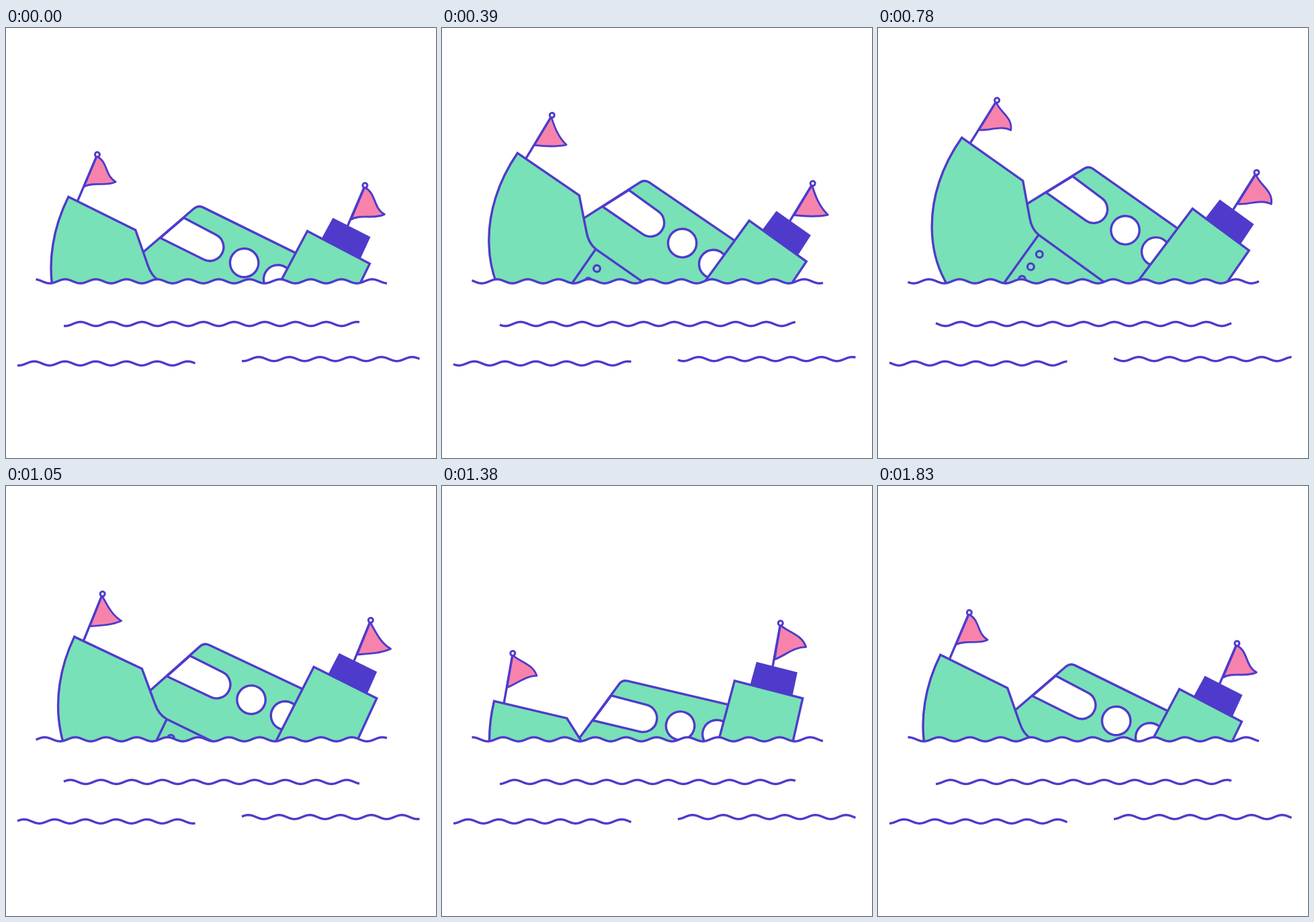
Write an HTML page with a canvas that moves like this. It is 640 by 640 pixels and loops after 1.86 s.

```html
<!DOCTYPE html>
<html lang="en">
<head>
<meta charset="utf-8">
<title>Sinking ship</title>
<style>
  html, body { margin: 0; width: 100%; height: 100%; overflow: hidden; background: #fff; }
  canvas { display: block; width: 100vw; height: 100vh; }
</style>
</head>
<body>
<canvas id="stage" width="640" height="640"></canvas>
<script>
const ctx = document.getElementById('stage').getContext('2d');
const INK = '#4f3bcb', GREEN = '#78e1b7', PINK = '#f783ad', WHITE = '#fff';
const LOOP = 1860, STEP = 30, SWING = 1830, RAD = Math.PI / 180;

// time, then [value, speed per second] for tilt, x, y and flag phase
const KEYS = [
  [0,    [-10.68, 13],  [324.3, 8],   [271.3, -50], [50, 560]],
  [240,  [-6.18, 22],   [329, 42],    [253.8, -88], [175, 660]],
  [540,  [0, 9],        [347.7, 35],  [225.5, -57], [400, 580]],
  [780,  [-1.73, -24],  [350.2, -24], [218.9, 23],  [510, 480]],
  [1050, [-11.65, -46], [333.4, -88], [240.4, 145], [655, 570]],
  [1380, [-23.68, -14], [307.5, -30], [287.5, 60],  [855, 610]],
  [SWING, [-10.68, 13], [324.3, 8],   [271.3, -50], [1130, 560]]
];
const HOME = [347.7, 225.5];

const WAVE = 45.7, WAVE_TIME = 450;
const SEA = [
  { x0: 44.5, x1: 567, y: 377, crest: 88, dir: 1 },
  { x0: 86, x1: 526, y: 440.5, crest: 111, dir: -1 },
  { x0: 17, x1: 281.5, y: 499.2, crest: 42, dir: -1 },
  { x0: 351, x1: 615.5, y: 492.7, crest: 376, dir: -1 }
];

function hermite([a, va], [b, vb], u, dt) {
  const w = 1 - u, s = dt / 1000;
  return a * w * w * (1 + 2 * u) + b * u * u * (3 - 2 * u)
    + va * s * u * w * w - vb * s * u * u * w;
}

function poseAt(t) {
  const time = Math.min(t, SWING);
  let i = 0;
  while (i < KEYS.length - 2 && time >= KEYS[i + 1][0]) i++;
  const from = KEYS[i], to = KEYS[i + 1], dt = to[0] - from[0];
  const u = (time - from[0]) / dt;
  return [1, 2, 3, 4].map(k => hermite(from[k], to[k], u, dt));
}

function paint(fill, width = 3.4) {
  if (fill) { ctx.fillStyle = fill; ctx.fill(); }
  ctx.strokeStyle = INK;
  ctx.lineWidth = width;
  ctx.stroke();
}

function trace(...points) {
  ctx.beginPath();
  points.forEach(p => ctx.lineTo(p[0], p[1]));
}

function ring(x, y, r, fill, width) {
  ctx.beginPath();
  ctx.arc(x, y, r, 0, 2 * Math.PI);
  paint(fill, width);
}

function traceWave({ x0, x1, y, crest, dir }, t) {
  const top = crest + dir * WAVE * t / WAVE_TIME;
  ctx.beginPath();
  for (let x = x0; x <= x1; x += 0.5) {
    ctx.lineTo(x, y - 3 * Math.cos(2 * Math.PI * (x - top) / WAVE));
  }
}

// Edge pushed along (nx, ny) by d1 at one third and d2 at two thirds
function bentEdge(a, b, nx, ny, d1, d2) {
  const p = 3 * d1 - 1.5 * d2, q = 3 * d2 - 1.5 * d1;
  const at = (u, d) => [a[0] + (b[0] - a[0]) * u + nx * d, a[1] + (b[1] - a[1]) * u + ny * d];
  ctx.bezierCurveTo(...at(1 / 3, p), ...at(2 / 3, q), b[0], b[1]);
}

function flag(x, y, foot, size, phase) {
  const inner = 2.7 * Math.sin(phase * RAD);
  const outer = 4.6 * Math.sin((phase - 70) * RAD);
  const head = [-1.2, 2.5], tip = [19.3, 45], heel = [-28.2, 43.3];
  trace(foot, [x - 1.8, y + 2.7]);
  paint(null);
  ctx.save();
  ctx.translate(x, y);
  ctx.scale(size, size);
  ctx.lineJoin = 'round';
  ctx.beginPath();
  ctx.moveTo(...head);
  bentEdge(head, tip, 0.896, -0.444, inner, outer);
  bentEdge(tip, heel, 0, -1, outer * 0.65, inner * 0.65);
  ctx.closePath();
  paint(PINK, 2.8);
  ctx.restore();
  ring(x, y, 3.5, WHITE, 3);
}

function cabin() {
  ctx.beginPath();
  ctx.moveTo(205, 272);
  ctx.arcTo(311.5, 210.6, 440, 307, 12);
  ctx.lineTo(520, 367);
  ctx.lineTo(400, 500);
  ctx.lineTo(205, 400);
  ctx.closePath();
  paint(GREEN);

  ctx.beginPath();
  ctx.moveTo(287, 225.5);
  ctx.arc(317, 275.5, 20.5, -52.6 * RAD, 127.4 * RAD);
  ctx.lineTo(247, 248.4);
  ctx.closePath();
  paint(WHITE);

  ring(363, 308, 21.2, WHITE);
  ring(407.7, 341.3, 21.2, WHITE);
}

function bow() {
  ctx.beginPath();
  ctx.moveTo(124, 163);
  ctx.lineTo(213, 230);
  ctx.lineTo(221.3, 285);
  ctx.bezierCurveTo(223, 298, 227, 305, 234, 311);
  ctx.lineTo(434, 465);
  ctx.lineTo(140, 465);
  ctx.bezierCurveTo(124, 430, 106, 400, 92, 374);
  ctx.bezierCurveTo(81, 352, 75, 328, 75.5, 297);
  ctx.bezierCurveTo(76, 251, 93, 204, 124, 163);
  ctx.closePath();
  paint(GREEN);
  trace([234, 311], [156, 413]);
  paint(null);
  for (let i = 0; i < 4; i++) ring(234.3 - 13.5 * i, 340 + 18.2 * i, 4.9, GREEN, 3.2);
}

function stern() {
  trace([483, 293.5], [505, 266.5], [554.7, 305], [534, 334]);
  ctx.closePath();
  ctx.fillStyle = INK;
  ctx.fill();
  trace([464, 279], [546.3, 343.7], [450, 474], [360, 409]);
  ctx.closePath();
  paint(GREEN);
}

function ship(t) {
  const [tilt, x, y, phase] = poseAt(t);
  ctx.save();
  traceWave(SEA[0], t);
  ctx.lineTo(640, 0);
  ctx.lineTo(0, 0);
  ctx.clip();
  ctx.translate(x, y);
  ctx.rotate(tilt * RAD);
  ctx.translate(-HOME[0], -HOME[1]);
  flag(178, 109, [136, 172], 1, phase);
  flag(561, 228, [524, 283], 1.06, phase);
  cabin();
  bow();
  stern();
  ctx.restore();
}

function draw(t) {
  ctx.fillStyle = WHITE;
  ctx.fillRect(0, 0, 640, 640);
  ship(t);
  SEA.forEach(row => { traceWave(row, t); paint(null); });
}

const start = performance.now();
function tick() {
  const t = (performance.now() - start) % LOOP;
  draw(Math.floor(t / STEP) * STEP);
  requestAnimationFrame(tick);
}
tick();
</script>
</body>
</html>
```
